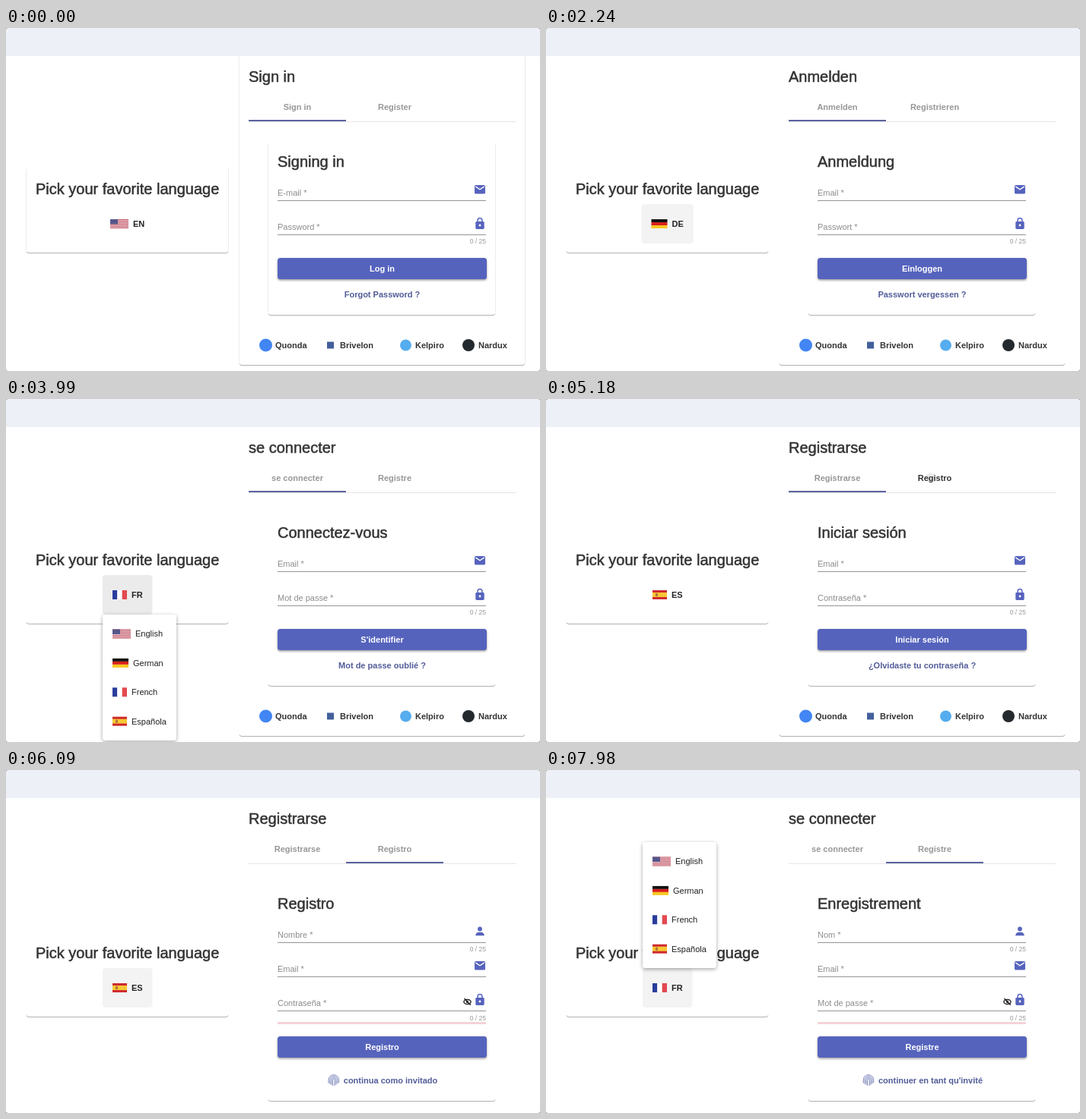
An HTML page with a canvas for the animation above (8000 ms loop, 702x452 px).

```html
<!DOCTYPE html>
<html lang="en">
<head>
<meta charset="utf-8">
<title>Language switch</title>
<style>
html, body { margin: 0; width: 100%; height: 100%; overflow: hidden; background: #fff; }
canvas { display: block; width: 702px; height: 452px; }
</style>
</head>
<body>
<canvas id="stage"></canvas>
<script>
const W = 702, H = 452, LOOP = 8000, STEP = 70;
const FONT = '"Liberation Sans", Arial, sans-serif';
const INDIGO = '#5663bd', INK = '#333', GREY = '#8c8c8c';
const canvas = document.getElementById('stage');
const c = canvas.getContext('2d');
const dpr = window.devicePixelRatio || 1;
canvas.width = W * dpr;
canvas.height = H * dpr;

const LANGS = {
  en: { code: 'EN', x: 137, title: 'Sign in', tabs: ['Sign in', 'Register'], login: 'Signing in',
    mail: 'E-mail *', pass: 'Password *', go: 'Log in', forgot: 'Forgot Password ?',
    reg: 'Register', name: 'Name *', guest: 'continue as guest' },
  de: { code: 'DE', x: 138.5, title: 'Anmelden', tabs: ['Anmelden', 'Registrieren'], login: 'Anmeldung',
    mail: 'Email *', pass: 'Passwort *', go: 'Einloggen', forgot: 'Passwort vergessen ?',
    reg: 'Registrieren', name: 'Name *', guest: 'als Gast fortfahren' },
  fr: { code: 'FR', x: 140, title: 'se connecter', tabs: ['se connecter', 'Registre'], login: 'Connectez-vous',
    mail: 'Email *', pass: 'Mot de passe *', go: "S'identifier", forgot: 'Mot de passe oublié ?',
    reg: 'Enregistrement', name: 'Nom *', guest: "continuer en tant qu'invité" },
  es: { code: 'ES', x: 140, title: 'Registrarse', tabs: ['Registrarse', 'Registro'], login: 'Iniciar sesión',
    mail: 'Email *', pass: 'Contraseña *', go: 'Iniciar sesión', forgot: '¿Olvidaste tu contraseña ?',
    reg: 'Registro', name: 'Nombre *', guest: 'continua como invitado' }
};
const FLAG_W = { en: 24, de: 21, fr: 19, es: 19 };
const ROWS = [['en', 'English'], ['de', 'German'], ['fr', 'French'], ['es', 'Española']];
const ROW_H = 38.4, MENU_H = 166, MENU_W = 97;

// Each visit to the menu: when it opens, when a row is pressed, and where
const VISITS = [
  { open: 630, press: 1330, row: 1, px: 181, dy: 0, pick: 'de' },
  { open: 2450, press: 2866, row: 2, px: 186, dy: 0, pick: 'fr' },
  { open: 3860, press: 4350, row: 3, px: 184, dy: 0, pick: 'es' },
  { open: 6170, press: 6840, row: 2, px: 178, dy: 2, pick: 'fr' },
  { open: 7700, press: Infinity }
];
const TAB_PRESS = 5170, SLIDE = 5245, CLICK = 80;

const clamp = v => Math.max(0, Math.min(1, v));

// cubic-bezier(x1, 0, x2, 1)
function ease(x1, x2, v) {
  v = clamp(v);
  let lo = 0, hi = 1;
  for (let i = 0; i < 24; i++) {
    const s = (lo + hi) / 2, r = 1 - s;
    if (3 * r * r * s * x1 + 3 * r * s * s * x2 + s * s * s < v) lo = s; else hi = s;
  }
  return lo * lo * (3 - 2 * lo);
}

function langAt(t) {
  let lang = 'en';
  for (const v of VISITS) if (t >= v.press + CLICK) lang = v.pick;
  return lang;
}

function rect(x, y, w, h, color) {
  c.fillStyle = color;
  c.fillRect(x, y, w, h);
}

function round(x, y, w, h, r, color) {
  c.fillStyle = color;
  c.beginPath();
  c.roundRect(x, y, w, h, r);
  c.fill();
}

function disc(x, y, r, color) {
  c.fillStyle = color;
  c.beginPath();
  c.arc(x, y, r, 0, Math.PI * 2);
  c.fill();
}

// y is the middle of the capitals
function text(str, x, y, { size = 11, bold = false, color = INK, align = 'left' } = {}) {
  c.font = (bold ? 'bold ' : '') + size + 'px ' + FONT;
  c.textAlign = align;
  c.fillStyle = color;
  c.fillText(str, x, y + size * 0.36);
}

function heading(str, x, y) {
  text(str, x, y, { size: 20 });
  c.strokeStyle = INK;
  c.lineWidth = 0.5;
  c.strokeText(str, x, y + 7.2);
}

function shadow(color, blur, dy) {
  c.shadowColor = color;
  c.shadowBlur = blur * dpr;
  c.shadowOffsetY = dy * dpr;
}

function card(x, y, w, h, sides) {
  c.lineWidth = 1;
  if (sides) {
    c.strokeStyle = '#ececec';
    c.beginPath();
    c.moveTo(x + .5, y);
    c.lineTo(x + .5, y + h - 3);
    c.moveTo(x + w - .5, y);
    c.lineTo(x + w - .5, y + h - 3);
    c.stroke();
  }
  c.strokeStyle = '#b2b2b2';
  c.beginPath();
  c.moveTo(x + 1, y + h - 1.5);
  c.quadraticCurveTo(x + 1.5, y + h + .5, x + 4, y + h + .5);
  c.lineTo(x + w - 4, y + h + .5);
  c.quadraticCurveTo(x + w - 1.5, y + h + .5, x + w - 1, y + h - 1.5);
  c.stroke();
}

function flag(lang, x, cy) {
  const w = FLAG_W[lang], y = cy - 6, h = 12;
  if (lang === 'en') {
    rect(x, y, w, h, '#f0e4e6');
    for (let i = 0; i < 7; i++) rect(x, y + i * 2 * h / 13, w, h / 13, '#c0485a');
    rect(x, y, 10, 6.5, '#55568a');
  } else if (lang === 'de') {
    ['#111', '#d8201c', '#f8c822'].forEach((k, i) => rect(x, y + i * 4, w, 4, k));
  } else if (lang === 'fr') {
    ['#2a3d9c', '#fff', '#e2494f'].forEach((k, i) => rect(x + i * w / 3, y, w / 3, h, k));
  } else {
    rect(x, y, w, h, '#cf2a2e');
    rect(x, y + 3, w, 6, '#f6c834');
    rect(x + 4, y + 4, 3, 4, '#b8743a');
  }
}

function mailIcon(x, y) {
  round(x - 7, y - 5.5, 14, 11.5, 1.5, INDIGO);
  c.strokeStyle = '#fff';
  c.lineWidth = 1.3;
  c.beginPath();
  c.moveTo(x - 5.8, y - 3.6);
  c.lineTo(x, y + .2);
  c.lineTo(x + 5.8, y - 3.6);
  c.stroke();
}

function lockIcon(x, y) {
  round(x - 5.7, y - 2.5, 11.4, 10, 1.4, INDIGO);
  c.strokeStyle = INDIGO;
  c.lineWidth = 1.5;
  c.beginPath();
  c.moveTo(x - 2.9, y - 2);
  c.lineTo(x - 2.9, y - 4);
  c.arc(x, y - 4, 2.9, Math.PI, 0);
  c.lineTo(x + 2.9, y - 2);
  c.stroke();
  disc(x, y + 2.5, 1.4, '#fff');
}

function personIcon(x, y) {
  disc(x, y - 3, 2.9, INDIGO);
  round(x - 5.8, y + 1.3, 11.6, 4.4, [5, 5, 0, 0], INDIGO);
}

function eyeIcon(x, y) {
  c.strokeStyle = '#222';
  c.lineWidth = 1.4;
  c.beginPath();
  c.ellipse(x, y, 4.6, 3, 0, 0, Math.PI * 2);
  c.stroke();
  disc(x, y, 1.6, '#222');
  c.beginPath();
  c.moveTo(x - 4, y - 4.5);
  c.lineTo(x + 4.3, y + 4.3);
  c.stroke();
}

function printIcon(x, y) {
  c.strokeStyle = '#6a74b4';
  c.lineWidth = .9;
  for (let i = 0; i < 4; i++) {
    const r = 1.3 + i * 1.8;
    c.beginPath();
    c.moveTo(x - r, y + 7 - i * 1.1);
    c.lineTo(x - r, y);
    c.arc(x, y - .6, r, Math.PI, 0);
    c.lineTo(x + r, y + 7 - i * 1.3);
    c.stroke();
  }
}

function field(label, y, icon) {
  text(label, 357, y, { color: GREY });
  rect(357, y + 10, 274, 1, '#959595');
  if (icon) icon(623, y - 4.5);
}

function counter(y) {
  text('0 / 25', 631, y, { size: 8.5, color: '#999', align: 'right' });
}

function button(label, y) {
  c.save();
  shadow('rgba(0,0,0,.4)', 3, 1.5);
  round(357, y, 275, 28, 3.5, INDIGO);
  c.restore();
  text(label, 494.5, y + 14, { bold: true, color: '#fff', align: 'center' });
}

function loginPane(L, t) {
  card(344, 152, 300, 226, t < 1470);
  heading(L.login, 357, 176);
  field(L.mail, 217, mailIcon);
  field(L.pass, 262, lockIcon);
  counter(281);
  button(L.go, 303);
  text(L.forgot, 494.5, 351, { bold: true, color: '#525c98', align: 'center' });
}

function registerPane(L) {
  card(344, 152, 300, 284, false);
  heading(L.reg, 357, 176);
  field(L.name, 217, personIcon);
  counter(236);
  field(L.mail, 262, mailIcon);
  field(L.pass, 307, lockIcon);
  eyeIcon(606.5, 305.5);
  counter(327);
  rect(357, 332, 274, 3, '#f4d3d8');
  button(L.tabs[1], 351);
  c.font = 'bold 11px ' + FONT;
  const x = 495.5 - (c.measureText(L.guest).width + 20) / 2;
  printIcon(x + 7, 409);
  text(L.guest, x + 20, 409, { bold: true, color: '#525c98' });
}

function tabs(L, t, slide) {
  if (t >= TAB_PRESS && t < 5900) {
    c.save();
    c.beginPath();
    c.rect(447, 84, 128, 39);
    c.clip();
    const a = .08 * clamp((5900 - t) / 250);
    disc(505, 104, 72 * ease(0, .2, (t - TAB_PRESS) / 450), `rgba(0,0,10,${a})`);
    c.restore();
  }
  const focus = t >= TAB_PRESS && t < 6090;
  text(L.tabs[0], 383, 104, { bold: true, color: '#979797', align: 'center' });
  text(L.tabs[1], 511, 104, { bold: true, color: focus ? INK : '#979797', align: 'center' });
  rect(319, 123, 352, 1, '#e6e6e6');
  rect(319 + 128 * slide, 121, 128, 2, '#5b639d');
}

function social() {
  disc(341.5, 418, 8.5, '#4285f4');
  text('Quonda', 354, 418, { bold: true });
  round(422, 413.5, 9, 9, 0, '#43609c');
  text('Brivelon', 439, 418, { bold: true });
  disc(525.5, 418, 7.5, '#55acee');
  text('Kelpiro', 538, 418, { bold: true });
  disc(608, 418, 8, '#24292e');
  text('Nardux', 621, 418, { bold: true });
}

function panel(L, t) {
  const slide = ease(.35, .25, (t - SLIDE) / 500);
  const moved = t >= SLIDE;
  if (!moved) card(306, 37, 377, 407, t < STEP);
  heading(L.title, 319, 64);
  tabs(L, t, slide);
  c.save();
  c.beginPath();
  c.rect(319, 124, 351, H);
  c.clip();
  c.translate(-351 * slide, 0);
  if (slide < 1) loginPane(L, t);
  c.translate(351, 0);
  if (moved) registerPane(L);
  c.restore();
  if (!moved) social();
}

function picker(lang, t) {
  const L = LANGS[lang], dy = t >= SLIDE ? 29 : 0;
  card(26, 186 + dy, 267, 110, t < STEP);
  heading('Pick your favorite language', 39, 212 + dy);

  const width = 2 * (159.7 - L.x) + 26;
  for (const v of VISITS) {
    if (t < v.open - 280 || t > v.open + 300) continue;
    c.save();
    c.beginPath();
    c.roundRect(L.x - 13, 232 + dy, width, 52, 4);
    c.clip();
    rect(0, 232 + dy, 300, 52, '#f3f3f3');
    const dt = t - v.open + CLICK;
    const a = .1 * clamp((260 - dt) / 160);
    if (dt > 0) disc(160, 258 + dy, 45 * ease(0, .2, dt / 225), `rgba(0,0,0,${a})`);
    c.restore();
  }
  flag(lang, L.x, 258 + dy);
  text(L.code, L.x + FLAG_W[lang] + 6, 258 + dy, { bold: true, color: '#222' });
}

function menu(v, t) {
  const fade = 1 - clamp((t - v.press - 95) / 100);
  if (t < v.open || fade <= 0) return;
  const grow = ease(0, .2, (t - v.open) / 120);
  if (grow <= 0) return;
  const x = LANGS[langAt(v.open)].x - 13;
  const above = v.open > SLIDE, y = above ? 95 : 284;
  const pivot = above ? y + MENU_H : y, k = .8 + .2 * grow;
  c.save();
  c.globalAlpha = fade * grow;
  c.translate(x, pivot);
  c.scale(k, k);
  c.translate(-x, -pivot);
  c.save();
  shadow('rgba(0,0,0,.36)', 5, 1.5);
  round(x, y, MENU_W, MENU_H, 3.5, '#fff');
  c.restore();

  const top = i => y + 6.3 + i * ROW_H;
  if (t > v.press) {
    c.save();
    c.beginPath();
    c.rect(x, top(v.row), MENU_W, ROW_H);
    c.clip();
    disc(v.px, top(v.row) + ROW_H / 2 + v.dy, 60 * ease(0, .2, (t - v.press) / 450), 'rgba(0,0,0,.11)');
    c.restore();
  }
  ROWS.forEach(([lang, name], i) => {
    const cy = top(i) + ROW_H / 2;
    flag(lang, x + 13, cy);
    text(name, x + 19 + FLAG_W[lang], cy, { color: '#222' });
  });
  c.restore();
}

function draw(t) {
  c.setTransform(dpr, 0, 0, dpr, 0, 0);
  rect(0, 0, W, H, '#fff');
  rect(0, 0, W, 37, '#edf0f6');
  const lang = langAt(t);
  panel(LANGS[lang], t);
  picker(lang, t);
  VISITS.forEach(v => menu(v, t));
  // window corners
  c.fillStyle = '#999';
  c.beginPath();
  c.rect(0, 0, W, H);
  c.roundRect(0, 0, W, H, 3);
  c.fill('evenodd');
}

const start = performance.now();
function tick() {
  const t = Math.max(0, performance.now() - start) % LOOP;
  draw(Math.floor(t / STEP) * STEP);
  requestAnimationFrame(tick);
}
tick();
</script>
</body>
</html>
```
